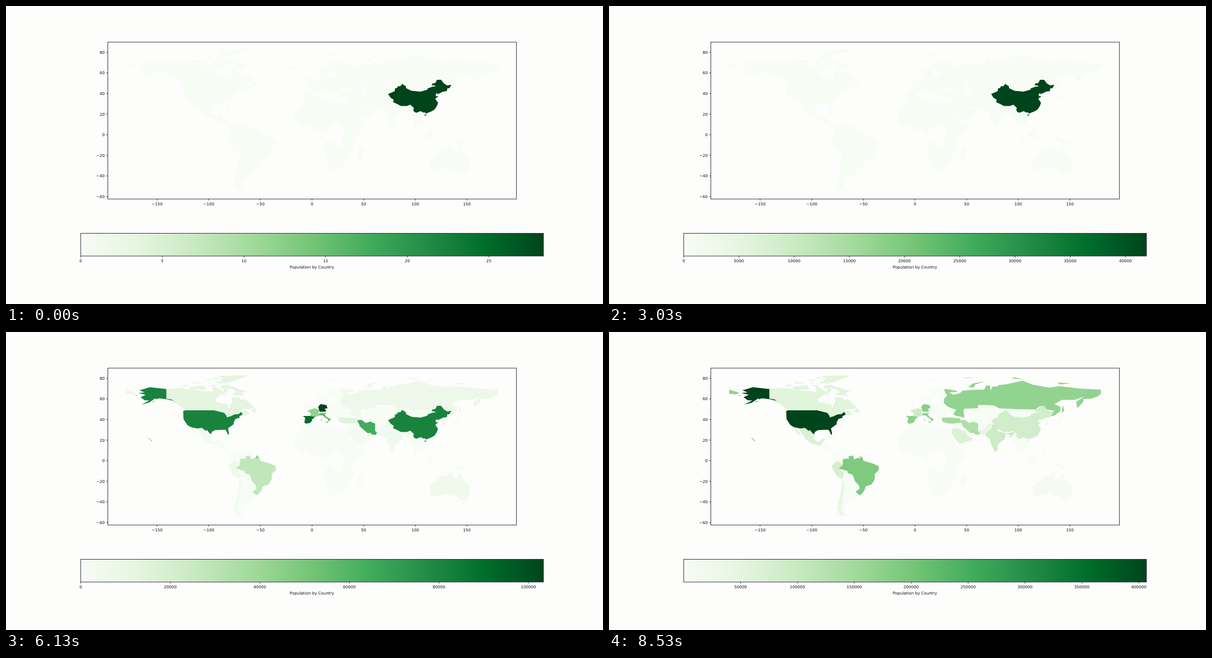
An HTML page for the animation above (8.56 s loop, 1058x529 px).

```html
<!DOCTYPE html>
<html lang="en">
<head>
<meta charset="utf-8">
<title>Population by Country</title>
<style>
html, body { margin: 0; width: 100%; height: 100%; overflow: hidden; background: #fdfdfc; }
svg { display: block; width: 100vw; height: 100vh; }
text { font: 7.1px "DejaVu Sans", sans-serif; fill: #111118; text-anchor: middle; }
.end { text-anchor: end; }
.line { fill: none; stroke: #24243a; stroke-width: .9; }
</style>
</head>
<body>
<svg viewBox="0 0 1058 529">
  <defs><linearGradient id="greens"></linearGradient></defs>
  <!-- Map units are degrees of longitude and latitude. -->
  <g transform="matrix(1.8305 0 0 -1.829 542.3 228.5)" fill="#f7fcf5">
    <path d="M31 70 28 71 19 70 12 65 5 62 6 58 11 59 13 56 17 58 17 61 22 65 22 60 28 60 24 57 20 55 14 54 11 57 8 57 9 54 2 51-5 48-1 46-2 43-9 43-9 37-5 36 0 39 4 43 9 44 14 45 19 41 22 37 24 40 29 41 30 46 36 45 50 52"/>
    <path d="M40 43 42 37 36 36 34 30 43 13 52 16 60 22 56 26 51 25 48 30 57 26 72 24 91 22 95 16 98 15 99 8 103 1 100 12 105 9 109 12 106 20 115 35 125 40 127 34 129 36 128 40 131 42 118 50 55 53 47 43"/>
    <path d="M-5 50 1 51-2 57-5 58-3 54M-10 52-6 52-6 55M-24 65-14 65-19 63.4M11 79 25 80 17 77M130 32 141 36 142 39 140 40 136 36M140 42 145 43 142 45"/>
    <path d="M120 18 122 18 124 13 120 14M122 7 126 6 125 11M109 1 117 7 118 1 115-4 110-3M95 5 106-3 105-6M105-7 114-8 110-6.5M119-5 120 1 125 1 121-1M131-1 146-6 151-10 143-9M173-35 178-38 175-41M173-41 171-46 167-46"/>
    <path d="M-6 36 10 37 11 34 20 31 33 31 37 20 43 12 51 12 48 4 39-5 40.5-15 35-20 35-24 28-33 19-34.5 15-27 12-17 13-10 9-1 9 4 4 6-8 4-13 9-17.5 15-17 21-10 30M49-12 50-16 47-25 44-24 44-17"/>
    <path d="M-92 14-91 18-88 18-83 15-83 10-77 8-72 12-62 10-50 1-35-6-39-14-41-22-48-26-54-34-58-34-57-38-65-41-68-46-69-51-65-55-75-52-73-37-70-18-81-6-78 4-80 7M-85 22-80 23-74 20-78 21M-74 18-68 18-70 20"/>
    <path fill="#fdfdfc" d="M12-6 20-7 22-11 29-13 29-4 31 4 27 10 22 11 15 5 9-1M-3 5-8 4-8 10-3 10M47 43 51 47 54 37 49 38"/>
    <g id="canada">
      <path d="M-141 69.6-128 70.5-115 69-109 68-96 67-96 72-92 71-86 67-85 70-81 69-82 67-87 65-94 60-93 57-82 55-80 51-79 54-77 57-78 62-70 61-69 59-65 60-56 52-60 50-66 50-71 47-65 49-60 46-65 43.5-67 45-79 42-83 42-83 45-95 48-123 48.5-130 55-141 60.2"/>
      <path d="M-62 67-68 66-65 63-78 64-73 67-78 70-88 70-89 73-81 73.5M-117 69-119 71.5-105 73-102 69M-126 72-117 73-124 74M-68 83-62 82.5-80 76-89 76.5-86 80-91 82"/>
      <path d="M-80 75-92 75-92 77M-117 75-115 76.5-106 75M-102 76-98 76-98 75M-96 72-90 74-102 73M-87 64-82 64-86 66M-59 47.5-53 47-56 51.5M-128 51-123.5 48.4-126 49M-87 79-96 80-93 81M-104 78-95 78-100 79"/>
    </g>
    <g id="russia">
      <path d="M31 69.6 28 69 31 63 28 60 28 56 31 53 35 51 40 49.6 37 45 40 43.4 48 42 46.8 48.4 48 50.5 61 51 61 54 71 54 77 53.4 81 51 98 50 117 49.7 121 53.3 127.7 49.8 135 48.5 131 43 135 44 140.5 48 141 52.5 135 54.7 142 59 155 59.2 140 66 44 66 40 64.6 37 64 33 66.6 41 66.7 40 68"/>
      <path d="M44 66 60 60 155 59.2 164 62.5 156 57 157 51 163 57 163 60 170 60 177 62.5 180 65 180 69 160 70 140 72.5 130 71 114 73.8 104 77.7 87 74 81 73.6 80 72 75 72 73 68 72.8 72.8 69 73 67 69 54 68.8 46 68"/>
      <path d="M-180 69-170 66-173 64.3-180 65M-180 71.5-177.6 71-180 71M68 77 56 75 51.6 71.5 57 71 58 74M93 80 96 81 105 79M138 76 151 75 140 74M143 54 144.6 49 142 46M46 80.5 51 80.8 58 80.3"/>
    </g>
    <path id="mexico" d="M-117 32.5-106 31.5-97 26-98 22-96 19-92 18.5-90 21-87 21.5-92 14.5-102 17.5-106 21-113 31.5-115 31.5-110 23-115 28"/>
    <path id="peru" d="M-70-4-75 0-81-5-76-14.6-70-18-69-12-74-7.4"/>
    <path id="chile" d="M-70-18-68-22-72-48-69-52-71-54-75.6-47-73-37"/>
    <path id="brazil" d="M-57.6-30.2-53.4-33.7-50.5-31-48.6-28-48-25-42-23-39-18-39-13-35-9-35-5.5-40-3-50 0-51.3 4.2-59 1.3-60 5-64.8 4-63.4 2.2-69.8 1.7-70-4.3-74-7.5-65.3-10-65.4-11.6-60.2-14-58-20-54.3-24-53.6-27"/>
    <path id="australia" d="M142.5-10.7 146-18 153-25.5 153-30 150-37.4 144-39 138-33 135-34.7 131-31.5 118-35 115-34 113.5-25 122-18 126-14 129.6-15 132.5-11.5 136.8-12 135.5-15 140-17.7M145-41 148-41 147-43.5"/>
    <path id="pakistan" d="M61.6 25 67 25 71 24.5 74.5 31 77 35 72 36.5 66 30 61 30"/>
    <path id="saudi" d="M35 28 37 31.5 42 31 48.4 28.5 51 24 55 22 55 20 43 16.4 39 21"/>
    <path id="india" d="M68.2 23.7 72.6 21 73.5 16 77.5 8 80 10.4 80.2 15.9 87 21.3 88 26 92 25 92.5 22 97 28 88 26.5 80 28.8 79 34.3 75 35.5 74.4 31 70 28"/>
    <path id="turkey" d="M26.2 41.8 35 42 43.6 41 44.8 37.2 36 36 30.6 36.5 26.3 38"/>
    <path id="iran" d="M44.8 39.7 44 38 46 35 45.6 34 50 30 54 26.7 57 27 57.4 25.7 61.5 25 63 27 61 29 61.2 36 56.6 38 52 36.7 48 39.6"/>
    <path id="korea" d="M126.5 34.5 129.3 35.5 128.4 38.5 126.7 37.6"/>
    <path id="italy" d="M7 44 7 46 13.8 46.5 12.3 45 14 42.7 18.5 40.2 16 38 15.4 40 10 44M15.5 38 15 36.7 12.4 37.8M9.5 41 9.5 39 8.4 39"/>
    <path id="france" d="M-4.6 48.5 2.5 51 8 49 6 46.3 7.5 43.9 3 42.5-1.9 43.4-1 46M9.4 43 9 41.4 8.6 42.3M-54 5.3-51.7 4.2-52.9 2-54.5 2.3"/>
    <path id="spain" d="M-9 43.3-1.9 43.4 3 42.5 0 40 0 38.7-2 36.7-6 36-7.4 37.2-6.5 41.5"/>
    <path id="germany" d="M8.6 54.9 14 54 15 51 12.2 50.3 13.6 48.8 13 47.6 7.6 47.6 6 51.8 7 53.7"/>
    <g id="china">
      <path d="M127.7 49.8 131 47.8 135 48.5 133 45.1 131 45 130.6 42.4 127 41.8 121 38.9 122 40.5 118 39 119 37.5 122.5 37.2 119.2 35 122 31 121 28 118.7 24.5 116 22.8 110 20.4 110 21.5 107 21.8 105 23.2 102 22.5 101 21.3 99 22.2 98 24 98.7 26 97 28.4 95 29.3 92 27.9"/>
      <path d="M101 21.3 98.7 26 95 29.3 92 27.9 86 27.9 82 30.1 78.7 31.5 79 34 76 36 73.7 39.5 80 42.2 80.5 45 82.5 45.5 83.2 47.2 85.4 47 87.4 49.3 91 46.9 91 45.3 96.3 42.7 105 41.8 111.8 43.7 112 45 117 46.7 120 46.8 118 48 115.7 47.8 116.7 49.8 119.3 50.1 121 53.3 125 53.3 127.7 49.8 120 40 119 28M111 20 108.6 19.2 109.6 18.2"/>
    </g>
    <g id="us">
      <path d="M-122.8 49-95 49-85 46.5-82.4 43-83 42-79 43-75 45-71 45.2-68.7 47.4-67 44.8-70.5 43-70 41.7-74 40.6-76 37-75.7 35.6-81.3 31.4-80.2 26-81.2 25.2-83 29-84 30.1-89.4 30-94 29.7-97.3 27.7-97.2 26-99 26.4-101.7 29.8-103 29-106.5 31.8-111 31.3-117 32.5-120.6 34.6-124.4 40.3-124.7 48.2"/>
      <path d="M-141 69.6-141 60.3-136 59.5-130 55-134 58.1-140 59.6-148 60.5-152 59.5-151 61-154 59-158 56.3-165 54.6-157.5 58.5-162 58.7-166 61.6-161 64-168 65.7-162 66.3-167 68.4-157 71.4M-172 63.4-169 63.4-169.5 63M-155 57-152 57.6-153 58M-156 20.2-155 19.5-155.7 19M-159.8 22.2-156 20.6-156 21"/>
    </g>
  </g>
  <g id="axes"></g>
  <rect class="line" x="180.4" y="64.1" width="724.2" height="278.6"/>
  <rect class="line" x="132.4" y="403.5" width="820" height="40.4" style="fill:url(#greens)"/>
  <g id="scale"></g>
  <text x="542.2" y="465.6">Population by Country</text>
</svg>
<script>
const LOOP = 8560;
const GREENS = ['f7fcf5', 'e5f5e0', 'c7e9c0', 'a1d99b', '74c476', '41ab5d', '238b45', '006d2c', '00441b']
  .map(hex => [0, 2, 4].map(i => parseInt(hex.substr(i, 2), 16)));
const el = id => document.getElementById(id);

// Counts in thousands at the given times.
const TIMES = [3930, 4930, 6130, 7730, 8530];
const COUNTS = {
  canada: [.2, 2, 13, 38, 57],
  russia: [.1, .2, 7, 71, 168],
  mexico: [.1, .1, 2, 30, 68],
  peru: [.1, .1, 6, 32, 80],
  chile: [.1, .2, 4, 17, 44],
  brazil: [.1, .5, 28, 102, 190],
  australia: [.1, 1, 5.5, 6.8, 7],
  pakistan: [.1, .5, 4, 18, 45],
  saudi: [.1, .3, 3, 28, 66],
  india: [.1, .2, 5, 40, 92],
  turkey: [.1, 1, 15, 126, 150],
  iran: [9.5, 22, 64, 106, 134],
  korea: [6, 8.5, 10, 10.7, 11],
  italy: [10, 25, 57, 150, 172],
  france: [1.4, 20, 43, 70, 92],
  spain: [1, 37, 90, 152, 174],
  germany: [1, 35, 103.3, 153, 178],
  china: [72, 77.25, 81, 83, 84],
  us: [.02, 20, 81, 272.4, 406.7]
};
const CHINA_TIMES = [0, 250, 900, 1500, 2170, 3150, 3350, 3930];
const CHINA_RISE = [.028, .55, 2.9, 9.8, 25, 45, 60, 72];

function grow(times, values, t) {
  let i = 0;
  while (i < times.length - 2 && t > times[i + 1]) i++;
  const f = Math.min(1, (t - times[i]) / (times[i + 1] - times[i]));
  return 1000 * values[i] * (values[i + 1] / values[i]) ** f;
}

function countAt(name, t) {
  if (t >= TIMES[0]) return grow(TIMES, COUNTS[name], t);
  if (name === 'china') return grow(CHINA_TIMES, CHINA_RISE, t);
  return 1000 * COUNTS[name][0] * Math.max(0, (t - 2900) / 1030) ** 2;
}

function green(f) {
  const p = Math.min(1, f) * 8, i = Math.min(7, Math.floor(p));
  return `rgb(${GREENS[i].map((c, k) => Math.round(c + (GREENS[i + 1][k] - c) * (p - i)))})`;
}

function tickStep(max) {
  const raw = max / 9, power = 10 ** Math.floor(Math.log10(raw));
  return [1, 2, 2.5, 5, 10].find(m => m * power >= raw) * power;
}

const bottomTick = (x, y, label) =>
  `<path class="line" d="M${x} ${y}v2.6"/><text x="${x}" y="${y + 11.3}">${label}</text>`;
const signed = n => String(n).replace('-', '\u2212');

el('greens').innerHTML = GREENS.map((c, i) => `<stop offset="${i / 8}" stop-color="rgb(${c})"/>`).join('');

let axes = '';
for (let lon = -150; lon <= 150; lon += 50) axes += bottomTick(542.3 + lon * 1.8305, 342.8, signed(lon));
for (let lat = -60; lat <= 80; lat += 20) {
  const y = 228.5 - lat * 1.829;
  axes += `<path class="line" d="M180.4 ${y}h-2.6"/><text class="end" x="175" y="${y + 2.6}">${signed(lat)}</text>`;
}
el('axes').innerHTML = axes;

function draw() {
  const t = performance.now() % LOOP;
  const counts = Object.keys(COUNTS).map(name => [name, countAt(name, t)]);
  const max = Math.max(...counts.map(c => c[1]));
  for (const [name, count] of counts) el(name).setAttribute('fill', green(count / max));

  const step = tickStep(max);
  let ticks = '';
  for (let v = t > 8300 ? step : 0; v <= max * 1.002; v += step)
    ticks += bottomTick(132.4 + 820 * Math.min(1, v / max), 443.9, Math.round(v));
  el('scale').innerHTML = ticks;
  requestAnimationFrame(draw);
}
draw();
</script>
</body>
</html>
```
